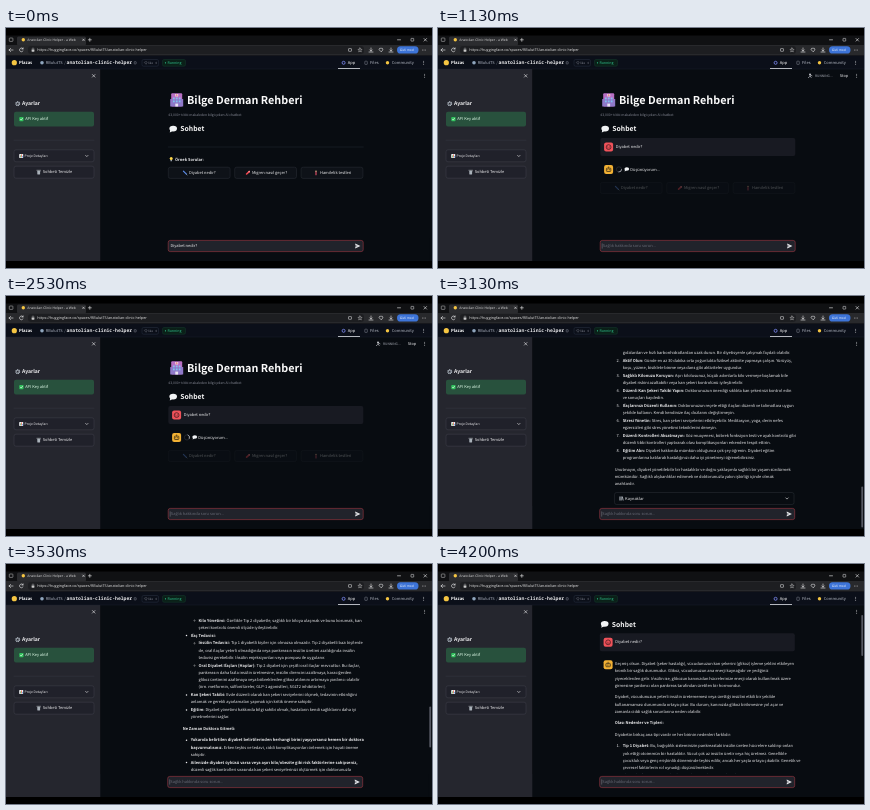
These frames come from a looping animation (426x240 px, 4270 ms). An HTML page:

```html
<!DOCTYPE html>
<html lang="tr">
<head>
<meta charset="utf-8">
<style>
  html, body { margin: 0; width: 100%; height: 100%; overflow: hidden; background: #000; }
  svg { display: block; width: 100vw; height: 100vh; }
  text { font-family: "Noto Sans CJK JP", "Noto Sans CJK SC", "Noto Sans CJK", "Open Sans", sans-serif; text-rendering: geometricPrecision; white-space: pre; }
  .ui { font-family: "Open Sans", "Noto Sans", sans-serif; }
  .mono { font-family: "Noto Sans Mono", "DejaVu Sans Mono", monospace; }
</style>
</head>
<body>
<svg id="stage" viewBox="0 0 426 240"></svg>
<script>
const LOOP = 4270, SUBMIT = 470, ANSWER = 2830;
const BG = '#080c11', INK = '#ececee', LINE = '#2d3038', GREY = '#858894', YELLOW = '#f5c542';

const rect = (x, y, w, h, fill, r = 0, extra = '') =>
  `<rect x="${x}" y="${y}" width="${w}" height="${h}" rx="${r}" fill="${fill}" ${extra}/>`;
const outlined = (x, y, w, h, fill = 'none', r = 2, stroke = LINE) =>
  rect(x, y, w, h, fill, r, `stroke="${stroke}" stroke-width=".5"`);
const dot = (x, y, r, fill, extra = '') => `<circle cx="${x}" cy="${y}" r="${r}" fill="${fill}" ${extra}/>`;
const path = (d, stroke = INK, width = .6, fill = 'none') =>
  `<path d="${d}" stroke="${stroke}" stroke-width="${width}" fill="${fill}" stroke-linecap="round" stroke-linejoin="round"/>`;
const text = (x, y, str, size = 3.97, fill = INK, extra = '') =>
  `<text x="${x}" y="${y}" font-size="${size}" fill="${fill}" ${extra}>${str}</text>`;
const group = (id, body, extra = '') => `<g id="${id}" ${extra}>${body}</g>`;
const bold = 'font-weight="700"', middle = 'text-anchor="middle"';
const cross = (x, y, r = 1.3) => path(`M${x - r} ${y - r}l${2 * r} ${2 * r}m0 ${-2 * r}l${-2 * r} ${2 * r}`);
const chevron = (x, y) => path(`M${x - 1.2} ${y - .6}l1.2 1.2 1.2-1.2`);
const kebab = (x, y) => [-1.5, 0, 1.5].map(d => dot(x, y + d, .45, INK)).join('');
const bubble = (x, y, s) =>
  `<g transform="translate(${x} ${y}) scale(${s})"><ellipse rx="4" ry="3" fill="#f1f3f5"/><path d="M-3 1l-.6 3 3-1.4z" fill="#f1f3f5"/></g>`;

// Line prefixes: p paragraph, digit or * list item, o nested item, space continuation.
const ANSWER_TEXT = `p Geçmiş olsun. Diyabet (şeker hastalığı), vücudunuzun kan şekerini (glikoz) işleme şeklini etkileyen
  kronik bir sağlık durumudur. Glikoz, vücudunuzun ana enerji kaynağıdır ve yediğiniz
  yiyeceklerden gelir. İnsülin ise, glikozun kanınızdan hücrelerinize enerji olarak kullanılmak üzere
  girmesine yardımcı olan pankreas tarafından üretilen bir hormondur.
p Diyabet, vücudunuzun yeterli insülin üretememesi veya ürettiği insülini etkili bir şekilde
  kullanamaması durumunda ortaya çıkar. Bu durum, kanınızda glikoz birikmesine yol açar ve
  zamanla ciddi sağlık sorunlarına neden olabilir.
p **Olası Nedenler ve Tipleri:**
p Diyabetin birkaç ana tipi vardır ve her birinin nedenleri farklıdır:
1 **Tip 1 Diyabet:** Bu, bağışıklık sisteminizin pankreastaki insülin üreten hücrelere saldırıp onları
  yok ettiği otoimmün bir hastalıktır. Vücut çok az insülin üretir veya hiç üretmez. Genellikle
  çocukluk veya genç erişkinlik döneminde teşhis edilir, ancak her yaşta ortaya çıkabilir. Genetik ve
  çevresel faktörlerin rol oynadığı düşünülmektedir.
2 **Tip 2 Diyabet:** En yaygın diyabet tipidir. Vücudunuz insüline direnç gösterir veya yeterince
  insülin üretemez. Bu tip genellikle yetişkinlerde görülür. Aşırı kilo, obezite, hareketsiz
  yaşam tarzı, genetik yatkınlık, ailede diyabet öyküsü, yüksek tansiyon ve yüksek kolesterol
  bulunur.
3 **Gestasyonel Diyabet:** Hamilelik sırasında bazı kadınlarda ortaya çıkan bir diyabet türüdür.
  Gebelik hormonları insülin direncine neden olabilir. Genellikle doğumdan sonra kaybolur,
  ancak gestasyonel diyabet geçiren kadınların gelecekte Tip 2 diyabet geliştirme riski daha
  yüksektir.
4 **Prediyabet (Gizli Şeker):** Kan şeker seviyelerinizin normalden yüksek, ancak Tip 2 diyabet
  tanısı koymak için yeterince yüksek olmadığı durumdur. Prediyabetli kişilerin Tip 2 diyabet
  geliştirme riski yüksektir, ancak yaşam tarzı değişiklikleriyle bu risk azaltılabilir veya
  önlenebilir.
p **Belirtiler:** Diyabetin bazı yaygın belirtileri şunlardır:
* Aşırı susuzluk
* Sık idrara çıkma
* Açıklanamayan kilo kaybı
* Açlık artışı
* Yorgunluk
* Bulanık görme
* Yavaş iyileşen yaralar
* Tekrarlayan enfeksiyonlar (özellikle idrar yolu enfeksiyonları ve cilt enfeksiyonları)
p **Tanı:** Diyabet tanısı, kan şekeri seviyelerini ölçen testlerle konulur:
* Açlık kan şekeri testi
* HbA1c testi
p **Tedavi ve Yönetim:** Tedavi, diyabetin tipine ve kişinin durumuna göre planlanır:
* **Yaşam Tarzı Değişiklikleri:**
o **Sağlıklı Beslenme:** Dengeli bir beslenme planı, kan şekerini kontrol altında
  tutmaya yardımcı olur. Lif açısından zengin gıdalar tercih edilmelidir.
o **Düzenli Egzersiz:** Fiziksel aktivite, insülin duyarlılığını artırır.
o **Kilo Yönetimi:** Özellikle Tip 2 diyabetle, sağlıklı bir kiloya ulaşmak ve bunu korumak, kan
  şekeri kontrolü önemli ölçüde iyileştirebilir.
* **İlaç Tedavisi:**
o **İnsülin Tedavisi:** Tip 1 diyabetli kişiler için olmazsa olmazdır. Tip 2 diyabetli bazı kişilerde
  de, oral ilaçlar yeterli olmadığında veya pankreasın insülin üretimi azaldığında insülin
  tedavisi gerekebilir. İnsülin enjeksiyonları veya pompası ile uygulanır.
o **Oral Diyabet İlaçları (Haplar):** Tip 2 diyabet için çeşitli oral ilaçlar mevcuttur. Bu ilaçlar,
  pankreasın daha fazla insülin üretmesine, insülin direncini azaltmaya, karaciğerden
  glikoz üretimini azaltmaya veya böbreklerden glikoz atılımını artırmaya yardımcı olabilir
  (örn. metformin, sülfonilüreler, GLP-1 agonistleri, SGLT2 inhibitörleri).
* **Kan Şekeri Takibi:** Evde düzenli olarak kan şekeri seviyelerini ölçmek, tedavinin etkinliğini
  anlamak ve gerekli ayarlamaları yapmak için kritik öneme sahiptir.
* **Eğitim:** Diyabet yönetimi hakkında bilgi sahibi olmak, hastaların kendi sağlıklarını daha iyi
  yönetmelerini sağlar.
p **Ne Zaman Doktora Gitmeli:**
* **Yukarıda belirtilen diyabet belirtilerinden herhangi birini yaşıyorsanız hemen bir doktora**
  **başvurmalısınız.** Erken teşhis ve tedavi, ciddi komplikasyonları önlemek için hayati öneme
  sahiptir.
* **Ailenizde diyabet öyküsü varsa veya aşırı kilo/obezite gibi risk faktörlerine sahipseniz,**
  düzenli sağlık kontrolleri sırasında kan şekeri seviyelerinizi ölçtürmek için doktorunuzla
  konuşun.
* **Diyabet tanısı aldıysanız,** doktorunuzun önerdiği tedavi planına uyun ve düzenli
  kontrollerinizi aksatmayın.
p **Öneriler:** Diyabeti önlemek veya yönetmek için şunları yapabilirsiniz:
1 **Sağlıklı Beslenin:** Bol miktarda sebze, meyve, tam tahıl ve yağsız protein tüketin.
  İşlenmiş gıdalardan, şekerli içeceklerden, doymuş yağ içeren
  gıdalardan ve hızlı karbonhidratlardan uzak durun. Bir diyetisyenle çalışmak faydalı olabilir.
2 **Aktif Olun:** Günde en az 30 dakika orta yoğunlukta fiziksel aktivite yapmaya çalışın. Yürüyüş,
  koşu, yüzme, bisiklete binme veya dans gibi aktiviteler uygundur.
3 **Sağlıklı Kilonuzu Koruyun:** Aşırı kilolusunuz, küçük adımlarla kilo vermeye başlamak bile
  diyabet riskini azaltabilir veya kan şekeri kontrolünü iyileştirebilir.
4 **Düzenli Kan Şekeri Takibi Yapın:** Doktorunuzun önerdiği sıklıkta kan şekerinizi kontrol edin
  ve sonuçları kaydedin.
5 **İlaçlarınızı Düzenli Kullanın:** Doktorunuzun reçete ettiği ilaçları düzenli ve talimatlara uygun
  şekilde kullanın. Kendi kendinize ilaç dozlarını değiştirmeyin.
6 **Stresi Yönetin:** Stres, kan şekeri seviyelerini etkileyebilir. Meditasyon, yoga, derin nefes
  egzersizleri gibi stres yönetimi tekniklerini deneyin.
7 **Düzenli Kontrolleri Aksatmayın:** Göz muayenesi, böbrek fonksiyon testi ve ayak kontrolü gibi
  düzenli tıbbi kontrolleri yaptırarak olası komplikasyonları erkenden tespit ettirin.
8 **Eğitim Alın:** Diyabet hakkında mümkün olduğunca çok şey öğrenin. Diyabet eğitim
  programlarına katılarak hastalığınızı daha iyi yönetmeyi öğrenebilirsiniz.
p Unutmayın, diyabet yönetilebilir bir hastalıktır ve doğru yaklaşımla sağlıklı bir yaşam sürdürmek
  mümkündür. Sağlıklı alışkanlıklar edinmek ve doktorunuzla yakın işbirliği içinde olmak
  anahtardır.`;

function layoutAnswer() {
  const indent = { p: 177.2, o: 193, '*': 185.2 };
  let y = 141, kind = 'p';
  const lines = ANSWER_TEXT.split('\n').map((line, i) => {
    const mark = line[0], str = line.slice(2);
    if (i) y += mark === ' ' ? 7.25 : mark === 'p' || kind === 'p' ? 11.5 : 7.75;
    if (mark !== ' ') kind = mark;
    return { mark, str, y, x: indent[kind] || indent['*'] };
  });
  const svg = lines.map(({ mark, str, y, x }) => {
    const rich = str.replace(/\*\*(.+?)\*\*/g, `<tspan ${bold}>$1</tspan>`);
    let marker = '';
    if (mark === '*') marker = dot(181, y - .3, .75, INK);
    if (mark === 'o') marker = dot(189, y - .3, .65, 'none', `stroke="${INK}" stroke-width=".35"`);
    if (mark > '0' && mark <= '9') marker = text(182.2, y + .8, mark + '.', 3.97, INK, 'text-anchor="end"');
    return marker + text(x, y + .8, rich);
  }).join('');
  return { svg, endY: y, yOf: part => lines.find(l => l.str.includes(part)).y };
}

function browser() {
  const strip = rect(0, 7.5, 426, 9.5, '#101113') + rect(11, 8.5, 69, 9, '#2b2c2f', 1.5)
    + outlined(3.3, 10, 3.6, 3.4, 'none', .6, '#cfcfcf') + dot(17.3, 11.8, 1.7, YELLOW)
    + text(21.3, 13, 'Anatolian Clinic Helper - a Web', 3.4, '#dedede', 'class="ui"')
    + cross(77.5, 11.8, .8) + path('M82.3 11.8h3m-1.5-1.5v3')
    + path('M391.5 11.8h3') + outlined(405, 10.4, 2.7, 2.7, 'none', .3, INK) + cross(419.3, 11.8);
  const bar = rect(0, 17, 426, 10.5, '#28292c') + rect(22, 18, 336, 8, '#1d1e21', 3)
    + path('M7 22h-4m1.6-1.6l-1.6 1.6 1.6 1.6') + path('M17 20.8a1.9 1.9 0 1 0 .1 2m0-3v1.2h-1.3')
    + rect(25.6, 21.4, 2.8, 2.3, '#c8c8c8', .4) + path('M26.2 21.4v-.7a.8.8 0 0 1 1.6 0v.7', '#c8c8c8', .4)
    + text(31.2, 23.2, 'https://huggingface.co/spaces/RBulutTS/anatolian-clinic-helper', 3.75, '#e4e4e4', 'class="ui"')
    + outlined(342.5, 20.6, 3, 2.7, 'none', .4, INK)
    + path('M354 20l.6 1.3 1.4.1-1 1 .3 1.4-1.3-.7-1.3.7.3-1.4-1-1 1.4-.1z', INK, .4)
    + path('M365 20v3m-1.2-1.1l1.2 1.2 1.2-1.2M363 24h4') + path('M375 23.6l-1.8-1.8a1 1 0 0 1 1.8-1 1 1 0 0 1 1.8 1z')
    + path('M385 20v3m-1.2-1.1l1.2 1.2 1.2-1.2M383 24h4')
    + rect(391, 18.3, 21.5, 7.2, '#3d74d8', 3.6) + text(400.8, 23.1, 'Gizli mod', 3.2, '#fff', `class="ui" ${middle}`)
    + [416.5, 418, 419.5].map(x => dot(x, 22, .4, INK)).join('');
  return strip + bar;
}

function siteHeader() {
  return rect(0, 27.5, 426, 13.5, '#0b0f19') + path('M0 41h426', '#1d2330', .4)
    + dot(8.3, 34.7, 2.6, YELLOW) + text(13, 36.3, 'Plazas', 4.2, '#fff', bold)
    + dot(36, 34.8, 1.8, '#8fa5bd') + text(39.7, 36.2, 'RBulutTS', 3.95, '#aeb4c0')
    + text(58.2, 36.2, '/', 4, '#7a8190')
    + text(60.6, 36.3, 'anatolian-clinic-helper', 4.75, INK, `class="mono" ${bold}`)
    + outlined(128.2, 33.7, 2, 2.2, 'none', .3, GREY)
    + outlined(136, 31.5, 16.5, 6.7, 'none', 1.5, '#293040') + path('M139.8 36l-1.2-1.2a.7.7 0 0 1 1.2-.8.7.7 0 0 1 1.2.8z', GREY, .4)
    + text(142.2, 35.8, 'like', 3, GREY) + text(149.5, 35.8, '0', 3, GREY)
    + outlined(156.5, 31.5, 23, 6.7, '#0a2018', 1.5, '#15392c') + dot(159.5, 34.8, .6, '#34d399')
    + text(161.4, 35.9, 'Running', 3.6, '#2fbf8b')
    + dot(337.6, 34.8, 1.5, 'none', 'stroke="#7f8cf5" stroke-width=".8"') + text(341.8, 36.1, 'App', 4, '#fff')
    + rect(332, 40, 22, .8, '#dfe2e8')
    + outlined(358.8, 33.2, 2.5, 3.2, 'none', .4, GREY) + text(364, 36.1, 'Files', 4, '#b7bcc6')
    + dot(381.5, 34.8, 1.7, YELLOW) + text(385.8, 36.1, 'Community', 4, '#b7bcc6')
    + kebab(417.7, 34.8);
}

function sidebar() {
  const bars = [[14, 2], [15, 3], [16, 1.4]].map(([x, h], i) =>
    rect(x, 129.4 - h, .7, h, ['#4caf50', '#e5533d', '#3f8ef0'][i])).join('');
  return rect(0, 41, 94.3, 192, '#25262e') + cross(87.7, 47.8)
    + dot(11.7, 75.7, 1.9, 'none', 'stroke="#b9c2cc" stroke-width="1.1" stroke-dasharray="1 .5"') + dot(11.7, 75.7, 1.2, 'none', 'stroke="#b9c2cc" stroke-width=".6"')
    + text(16, 77.4, 'Ayarlar', 5.1, INK, bold)
    + rect(8, 83.8, 80, 14.6, '#28513d', 2) + rect(13.3, 89, 4.2, 4.2, '#2fc05b', .7) + path('M14.4 91.2l.8.9 1.4-1.9', '#fff', .6)
    + text(19.2, 92.4, 'API Key aktif', 3.97, '#dffbe8')
    + path('M8 112.2h80', '#3b3d47', .4)
    + outlined(8, 121.8, 80, 12, '#20212a', 2, '#41434d') + rect(13.2, 126, 4, 4, '#eef0f2', .4) + bars
    + text(18.5, 128.9, 'Proje Detayları', 3.4) + chevron(80.8, 128)
    + outlined(8, 138.2, 80, 12, '#20212a', 2, '#41434d') + rect(31.3, 142.8, 2.8, 3.6, '#aab2ba', .4) + path('M30.9 142.3h3.6', '#d5dadf', .5)
    + text(36.7, 145.4, 'Sohbeti Temizle');
}

function chips(y) {
  const icons = [
    x => path(`M${x - 1.6} ${y - 1.6}l3 3`, '#5d8ff0', 1.1) + path(`M${x + 1.4} ${y + 1.4}l.8.8`, '#cdd', .4),
    x => path(`M${x - 1.4} ${y + 1.2}l2.6-2.4`, '#f0454f', 1.6) + dot(x + 1.2, y - 1.2, .9, '#ff8f93'),
    x => dot(x, y - 1.5, .8, '#e9b48a') + path(`M${x} ${y - .3}v2.2`, '#c9475f', 1.3)
  ];
  const labels = ['Diyabet nedir?', 'Migren nasıl geçer?', 'Hamilelik testleri'];
  const iconX = [179, 242, 310];
  return labels.map((label, i) => {
    const x = 162.3 + i * 66.4;
    return outlined(x, y - 5.6, 61.8, 11.2, '#0e1218') + icons[i](iconX[i]) + text(iconX[i] + 4, y + 1.3, label);
  }).join('');
}

function avatar(y, fill, isBot) {
  const face = isBot
    ? rect(168.4, y - 1.3, 4.4, 3.4, 'none', .7, 'stroke="#2a2111" stroke-width=".7"') + dot(169.8, y + .3, .5, '#2a2111')
      + dot(171.4, y + .3, .5, '#2a2111') + path(`M170.6 ${y - 1.4}v-1.1`, '#2a2111', .6)
    : dot(170.6, y, 2.4, 'none', 'stroke="#37161a" stroke-width=".7"') + dot(169.7, y - .3, .4, '#37161a')
      + dot(171.5, y - .3, .4, '#37161a') + path(`M169.6 ${y + .9}h2`, '#37161a', .4);
  return rect(166.1, y - 4.5, 9, 9, fill, 2) + face;
}

function pageTop() {
  const windows = [0, 1, 2, 3, 4, 5].map(i => rect(167 + i % 3 * 2.9, 69.5 + (i > 2 ? 3 : 0), 1.7, 1.8, '#7fc4ef')).join('');
  return rect(165.2, 65.3, 11, 13.2, '#b86fc4', 1) + rect(164.2, 71, 13, 7.5, '#8f79c9', .6) + windows
    + rect(169.2, 66, 3, 2.4, '#f3f0f8', .4) + path('M170.7 66.4v1.6m-.8-.8h1.6', '#e5484d', .5) + rect(169.3, 75.6, 2.8, 2.9, '#e7e3f0')
    + text(181, 76, 'Bilge Derman Rehberi', 10.8, '#fafafa', bold)
    + text(162.3, 88, '43,000+ tıbbi makaleden bilgi çeken AI chatbot', 3.4, GREY)
    + bubble(167.2, 100.6, .95) + text(174.3, 103.3, 'Sohbet', 6.8, '#fafafa', bold);
}

const answer = layoutAnswer();
const sourcesY = answer.endY + 8;

const intro = path('M162.3 119h195', LINE, .4)
  + dot(165.2, 130.6, 1.5, '#ffd84d') + rect(164.5, 132, 1.4, 1.3, '#b5bcc4', .3)
  + text(169, 133, 'Örnek Sorular:', 3.97, INK, bold) + chips(144.8);
const question = rect(162.3, 110, 195, 18, '#181a22', 2) + avatar(119.1, '#f0525a', false) + text(177.7, 120.2, 'Diyabet nedir?')
  + avatar(141.4, '#f2b134', true);
const thinking = dot(181, 141.4, 2.6, 'none', `stroke="${LINE}" stroke-width=".7"`)
  + group('spinner', path('M181 138.8a2.6 2.6 0 0 1 2.6 2.6', '#c9ccd3', .7))
  + bubble(188.8, 141, .6) + text(192.3, 142.6, 'Düşünüyorum...')
  + group('stale', chips(160), 'opacity=".3"');
const sources = outlined(177, sourcesY, 179.5, 12, BG) + path(`M182.4 ${sourcesY + 4.4}v3.2m1.3-3.2v3.2m1.2-3.2l.7 3.2`, '#cdd4dc', .8)
  + text(187.6, sourcesY + 7.2, 'Kaynaklar') + chevron(349.5, sourcesY + 6);

const running = dot(372, 46.3, .9, '#d9dbe0') + path('M370.4 49.6l1.4-1.2.6-1.6 1.6.9m-1.8.4l1 1.4', '#d9dbe0', .6)
  + text(377, 49.2, 'RUNNING...', 3.3, '#a8abb5') + text(401.8, 49.3, 'Stop', 3.9);
const input = rect(94.3, 210, 329, 23, BG) + outlined(162.2, 212.4, 195, 11.2, '#21232b', 2, '#b83e4a')
  + group('typed', text(164.5, 219.2, 'Diyabet nedir?'))
  + group('hint', text(164.8, 219.2, 'Sağlık hakkında soru sorun...', 3.97, '#666974') + path('M164.2 215.8v4.4', '#c8cad0', .3))
  + '<path d="M349.2 215.6l5.2 2.4-5.2 2.4.2-1.9 2.6-.5-2.6-.5z" fill="#e6e7ea"/>';

document.getElementById('stage').innerHTML =
  '<clipPath id="view"><rect x="94.3" y="53" width="331" height="157"/></clipPath>'
  + rect(0, 0, 426, 240, '#000') + rect(94.3, 41, 331.7, 192, BG)
  + `<g clip-path="url(#view)">${group('page', pageTop() + group('intro', intro) + group('question', question)
    + group('thinking', thinking) + group('answer', answer.svg + sources))}</g>`
  + group('running', running) + kebab(418.7, 47.8) + group('input', input)
  + group('thumb', rect(423.3, 0, 1.8, 41, '#555862', .9))
  + sidebar() + siteHeader() + browser();

const bottom = answer.yOf('Unutmayın') - 174;
const scrollKeys = [
  [3230, bottom],
  [3530, answer.yOf('Kilo Yönetimi') - 56],
  [3800, answer.yOf('Gestasyonel Diyabet:') - 75.5],
  [4200, 41],
  [LOOP, 24]
];

function scrollAt(t) {
  if (t <= scrollKeys[0][0]) return bottom;
  const i = scrollKeys.findIndex(([time]) => t <= time);
  const [t0, y0] = scrollKeys[i - 1], [t1, y1] = scrollKeys[i];
  return y0 + (y1 - y0) * (t - t0) / (t1 - t0);
}

const el = id => document.getElementById(id);
const show = (id, on) => el(id).setAttribute('display', on ? 'inline' : 'none');
const move = (id, x, y) => el(id).setAttribute('transform', `translate(${x} ${y})`);

function render(t) {
  const sent = t >= SUBMIT, answered = t >= ANSWER, waiting = sent && !answered;
  const scroll = answered ? scrollAt(t) : 0;
  const shift = answered ? -.5 : 0;
  show('intro', !sent);
  show('typed', !sent);
  show('hint', sent);
  show('question', sent);
  show('thinking', waiting);
  show('running', waiting);
  show('answer', answered);
  show('thumb', answered);
  move('page', shift, -scroll);
  move('input', shift, 0);
  move('thumb', 0, 41.5 + 149 * scroll / bottom);
  el('spinner').setAttribute('transform', `rotate(${t * .72 % 360} 181 141.4)`);
}

const start = performance.now();
function tick() {
  render((performance.now() - start) % LOOP);
  requestAnimationFrame(tick);
}
tick();
</script>
</body>
</html>
```
